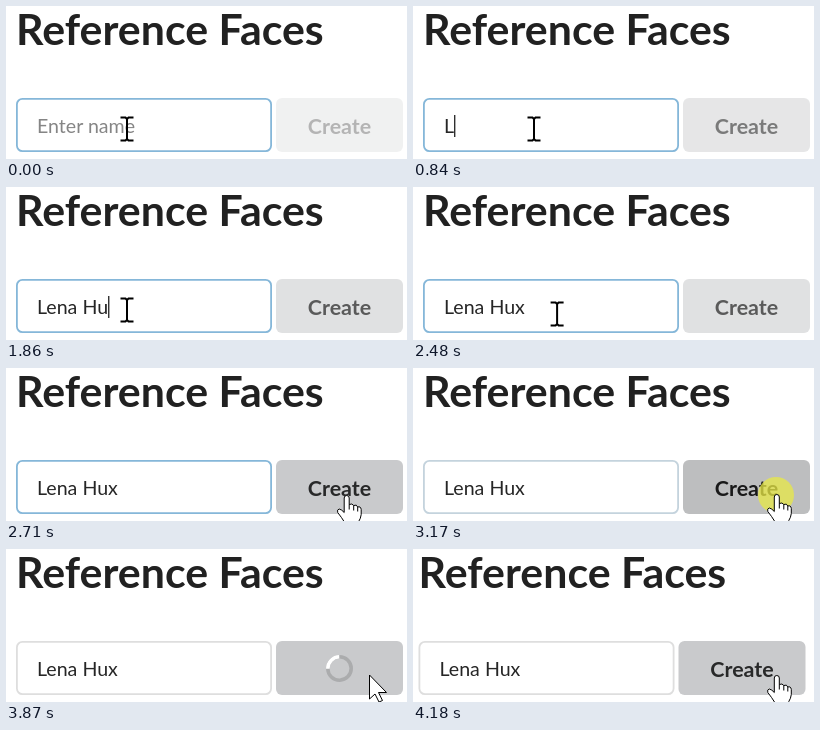
An HTML page for the animation above (4650 ms loop, 401 by 153 pixels).

```html
<!DOCTYPE html>
<html lang="en">
<head>
<meta charset="utf-8">
<title>Reference Faces</title>
<style>
  html, body { margin: 0; width: 100%; height: 100%; overflow: hidden; background: #fff; }
  svg { display: block; }
  text { font-family: Lato, sans-serif; white-space: pre; }
  .bold { font-weight: 700; }
  .cursor { fill: #fff; stroke: #000; stroke-linejoin: round; }
</style>
</head>
<body>
<svg width="401" height="153" viewBox="0 0 401 153">
  <g id="page">
    <text class="bold" x="10" y="39" font-size="42.9" fill="#212121">Reference Faces</text>
    <rect id="field" x="10.9" y="92.9" width="254.2" height="52.2" rx="5.5" fill="#fff" stroke-width="1.8"/>
    <text id="entry" x="31" y="127" font-size="19.6"></text>
    <rect id="caret" y="109" width="1.3" height="22" fill="#222"/>
    <g id="button">
      <rect id="face" x="270" y="92" width="127" height="54" rx="6"/>
      <text id="label" class="bold" x="333.5" y="128" font-size="21.45" text-anchor="middle">Create</text>
      <g id="spinner" fill="none" stroke-width="3.6">
        <circle r="11.7" stroke="#000" stroke-opacity=".15"/>
        <path d="M-8.27 -8.27A11.7 11.7 0 0 1 8.27 -8.27" stroke="#fff"/>
      </g>
    </g>
  </g>
  <circle id="press" cx="363" cy="127" r="18" fill="#e8e846" fill-opacity=".75"/>
  <g id="pointer">
    <path id="beam" d="M-6.5 -11.5H-1.5L0 -10L1.5 -11.5H6.5M0 -10V10M-6.5 11.5H-1.5L0 10L1.5 11.5H6.5" fill="none" stroke="#000" stroke-width="2"/>
    <path id="arrow" class="cursor" transform="translate(.5 0)" d="M0 0V24L5.5 19L9.5 27L13 25.5L9 17.5H17Z"/>
    <path id="hand" class="cursor" transform="translate(.8 .5)" d="M-2.5 2.5Q-2.5 0 0 0Q2.5 0 2.5 2.5V9Q5.5 7.5 7 10Q10 8.5 11 11.5Q14 10.5 14.5 14V19Q14 23 12 26V30H-2V27Q-5 22 -9 17Q-10 14 -7.5 13.5Q-5 14 -2.5 17ZM2.5 9V14M7 10V15M11 11.5V16"/>
  </g>
</svg>
<script>
const LOOP = 4650, STEP = 77.5;
const NAME = "Lena Hux";
const KEY_STEPS = [11, 13, 15, 18, 20, 22, 24, 25];

const $ = id => document.getElementById(id);
const show = (id, on) => $(id).setAttribute("visibility", on ? "visible" : "hidden");
const paint = (id, attrs) => {
  for (const key in attrs) $(id).setAttribute(key, attrs[key]);
};

function render(time) {
  const n = Math.min(59, Math.floor((time + 13) / STEP));
  const focused = n < 41;
  const pressed = n === 41 || n === 42;
  const loading = n >= 43 && n < 54;

  // Text field
  const typed = KEY_STEPS.filter(step => n >= step).length;
  $("entry").textContent = typed ? NAME.slice(0, typed) : "Enter name";
  paint("entry", { fill: typed ? "#262626" : "#858585" });
  paint("field", { stroke: focused ? "#85b7d9" : n === 41 ? "#c4d3dd" : "#dedede" });
  const caretX = 31 + (typed ? $("entry").getComputedTextLength() : 0);
  paint("caret", { x: caretX });
  show("caret", focused && n >= 5 && (n < 32 || n >= 38));

  // Pointer glides from the field to the button
  const progress = Math.max(0, Math.min(1, (n - 31) / 5));
  const x = 121 + 242 * (1 - Math.cos(Math.PI * progress)) / 2;
  const y = progress === 0 ? 123 : progress === 1 ? 126 : 127;
  paint("pointer", { transform: `translate(${x} ${y})` });
  const hover = x >= 270;
  const inField = x < 266;
  show("beam", inField);
  show("hand", hover && !loading);
  show("arrow", !inField && (!hover || loading));
  show("press", pressed);

  // Button
  paint("button", { opacity: n < 11 ? 0.45 : n === 11 ? 0.8 : 1 });
  paint("face", {
    fill: pressed ? "#bdbebf" : n === 34 ? "#d5d6d7" : hover ? "#c9cacc" : "#e0e1e2"
  });
  paint("label", { "fill-opacity": pressed ? 0.87 : hover ? 0.8 : 0.6 });
  show("label", !loading);
  show("spinner", loading);
  const angle = (n * STEP - 3352) / 600 * 360;
  paint("spinner", { transform: `translate(333.5 119.5) rotate(${angle})` });

  // The page recentres when the submission finishes
  paint("page", { transform: `translate(${n >= 54 ? -4.5 : 0} 0)` });
}

function frame() {
  render(performance.now() % LOOP);
  requestAnimationFrame(frame);
}
frame();
</script>
</body>
</html>
```
